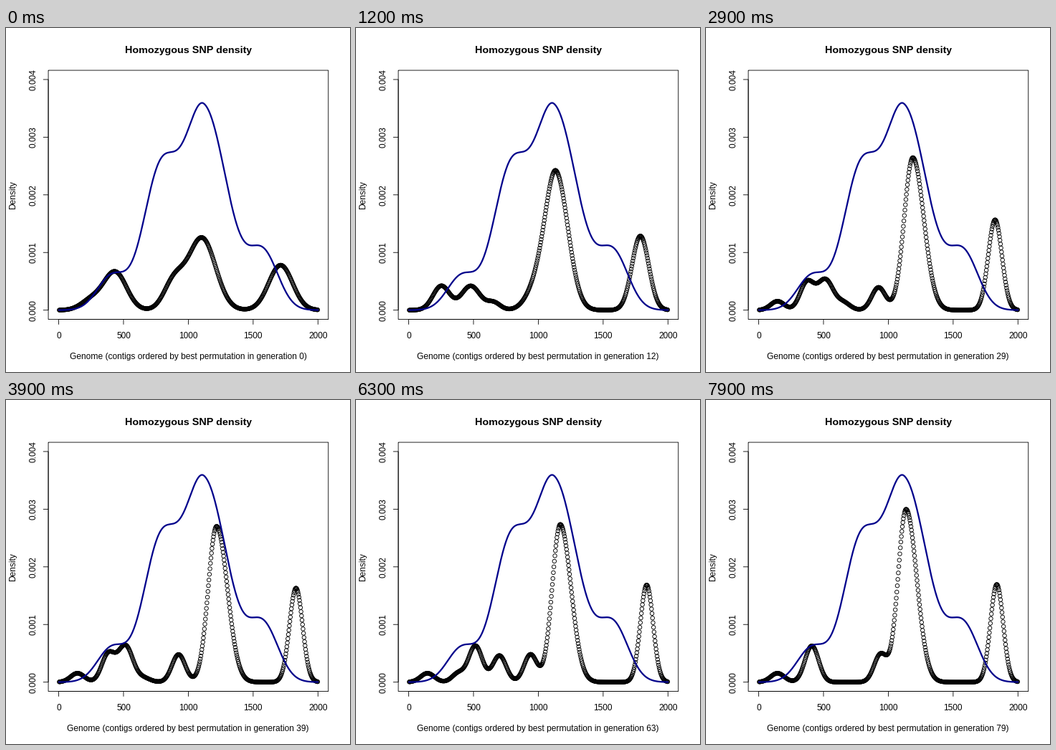
A matplotlib script for the animation above (8000 ms loop, 480 by 480 pixels).

```python
import numpy as np
import matplotlib.pyplot as plt
from matplotlib.animation import FuncAnimation

plt.rcParams["font.family"] = "Liberation Sans"
plt.rcParams["text.hinting"] = "no_autohint"

SIZE, FRAMES, STEP = 480, 80, 100
LEFT, RIGHT, TOP, BOTTOM = 59.04, 449.76, 59.04, 406.56
X0, X1, Y0, Y1 = 73.51, 435.29, 393.69, 71.91

xs = np.linspace(4, 1998, 512)


def px(x):
    return X0 + (X1 - X0) * np.asarray(x) / 2000


def py(d):
    """Density in thousandths to pixels."""
    return Y0 + (Y1 - Y0) * np.asarray(d) / 4


def hump(center, height, width, right=None):
    """Gaussian hump, optionally with a different width on its right."""
    w = np.where(xs < center, width, right or width)
    return height * np.exp(-0.5 * ((xs - center) / w) ** 2)


def density(gen):
    def ramp(a, b):
        return np.clip((gen - a) / (b - a), 0, 1)

    def pulse(a, b, c):
        return ramp(a, b) - ramp(b, c)

    def settle(start, end, tau=13):
        return end + (start - end) * np.exp(-gen / tau)

    # The main peak wanders right, then back, while it sharpens.
    center = 1105 + 113 * ramp(0, 39) - 81 * ramp(39, 79)
    main = hump(center, settle(1.25, 2.74, 10.5) + .26 * ramp(63, 79),
                settle(105, 62), settle(105, 82))
    last = hump(settle(1712, 1837), settle(.78, 1.7, 15), settle(92, 49, 12))
    shoulder = hump(
        890 + 95 * pulse(0, 12, 18) + 35 * ramp(0, 18) + 15 * ramp(52, 63),
        .48 - .22 * pulse(12, 18, 36),
        settle(78, 50) + 25 * pulse(0, 12, 18))

    # Small groups on the left split, merge and vanish.
    first = hump(145, .155 * ramp(12, 18), 53)
    second = hump(
        252 + 112 * ramp(12, 18) + 18 * ramp(22, 36),
        .17 + .25 * ramp(0, 12) + .06 * ramp(12, 18) - .48 * ramp(39, 52)
        + .15 * pulse(52, 63, 79),
        settle(80, 46, 20))
    third = hump(
        435 + 80 * ramp(0, 22) - 28 * pulse(39, 52, 63) - 105 * ramp(63, 79),
        .66 - .24 * ramp(0, 12) + .21 * ramp(22, 36),
        settle(88, 52, 20))
    fourth = hump(655, .13 * pulse(0, 12, 24) + .15 * pulse(12, 24, 52), 52)
    fifth = hump(720 - 20 * ramp(52, 63),
                 .46 * (ramp(39, 52) - ramp(63, 79)), 52)
    return (main + last + shoulder
            + first + second + third + fourth + fifth)


reference = (hump(410, .59, 112) + hump(782, 2.33, 133)
             + hump(1120, 3.49, 150, 180) + hump(1580, .95, 115))

fig = plt.figure(figsize=(SIZE / 72, SIZE / 72), dpi=72, facecolor="white")
ax = fig.add_axes([0, 0, 1, 1])
ax.set(xlim=(0, SIZE), ylim=(SIZE, 0))
ax.axis("off")


def rule(x, y):
    ax.plot(x, y, color="black", lw=0.85, snap=False,
            solid_capstyle="butt", solid_joinstyle="miter")


def label(x, y, text, size=12, **kw):
    return ax.text(x, y, text, size=size, ha="center", va="baseline",
                   rotation_mode="anchor", **kw)


rule([LEFT, RIGHT, RIGHT, LEFT, LEFT], [TOP, TOP, BOTTOM, BOTTOM, TOP])
rule([X0, X1], [BOTTOM, BOTTOM])
rule([LEFT, LEFT], [Y0, Y1])
for v in range(0, 2001, 500):
    rule([px(v)] * 2, [BOTTOM, BOTTOM + 7.2])
    label(px(v), 433, str(v))
for v in range(5):
    rule([LEFT, LEFT - 7.2], [py(v)] * 2)
    label(41.4, py(v), f"0.00{v}", rotation=90)

mid = (LEFT + RIGHT) / 2 - 0.4
label(mid, 35, "Homozygous SNP density", 14.4, weight="bold")
label(13, (TOP + BOTTOM) / 2, "Density", rotation=90)
caption = label(mid, 462, "")

dots = ax.scatter(px(xs), py(density(0)), s=5.4 ** 2, facecolors="none",
                  edgecolors="black", linewidths=0.9, zorder=3)
dots.set_snap(False)
ax.plot(px(xs), py(reference), color="#00008B", lw=2.25, zorder=4)


def update(gen):
    dots.set_offsets(np.column_stack([px(xs), py(density(gen))]))
    caption.set_text(
        f"Genome (contigs ordered by best permutation in generation {gen})")
    return dots, caption


anim = FuncAnimation(fig, update, frames=FRAMES, interval=STEP,
                     repeat=True, repeat_delay=0, blit=False)
plt.show()
```
